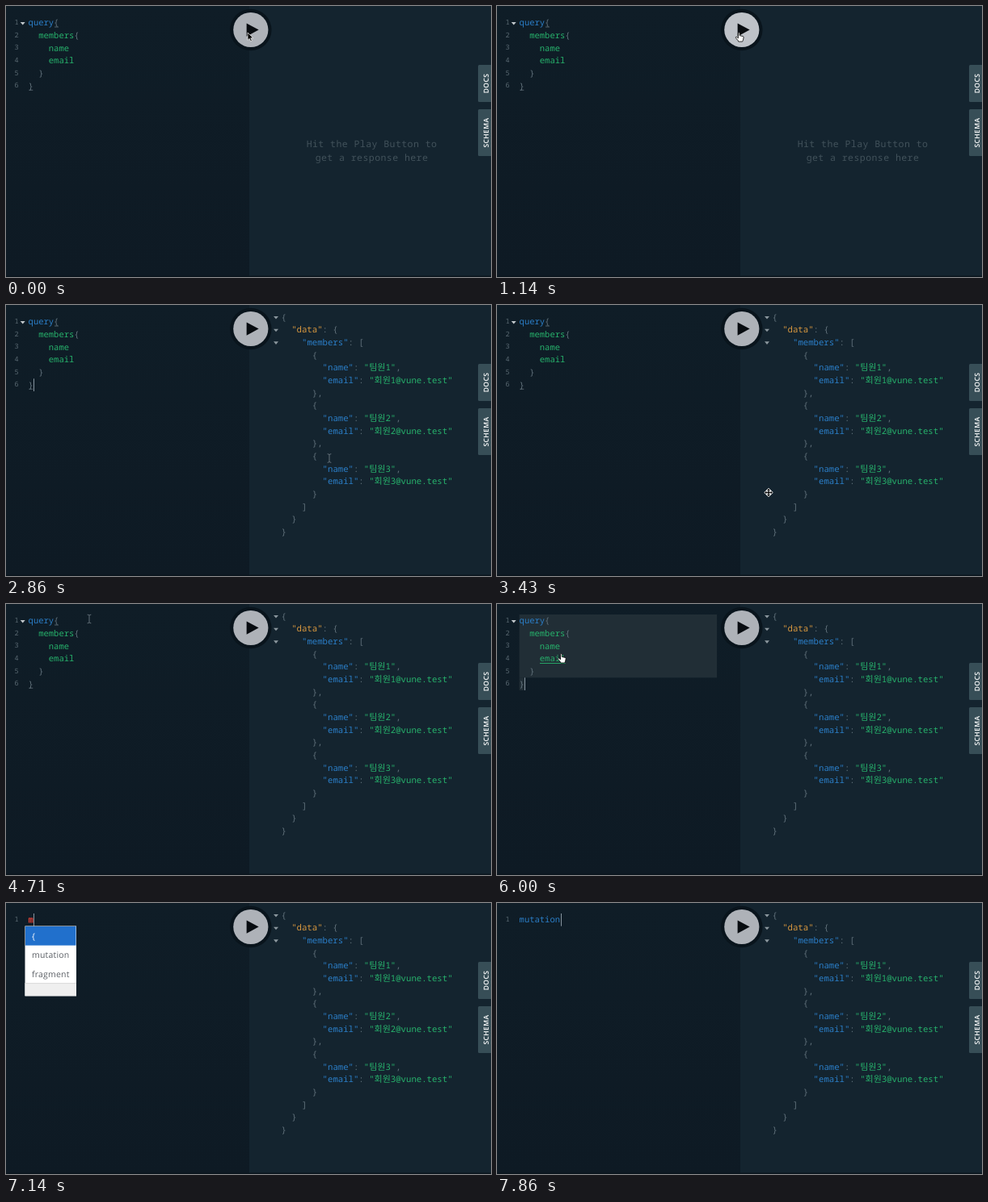
These frames come from a looping animation (600x336 px, 8 s). An HTML page:

```html
<!DOCTYPE html>
<html lang="ko">
<head>
<meta charset="utf-8">
<style>
html, body { margin: 0; width: 100%; height: 100%; overflow: hidden; background: #0e1b25; }
svg { display: block; width: 600px; height: 336px; }
text { font: 10.5px "Noto Sans Mono", "Noto Sans CJK KR", monospace; fill: #60707a; text-rendering: geometricPrecision; white-space: pre; }
.kw { fill: #2b7fc9; }
.def { fill: #d9983f; }
.str { fill: #27b26c; }
.json { font-size: 10.67px; }
.ko { font: 11px "Noto Sans CJK KR", sans-serif; }
.num { font-size: 8.6px; fill: #596871; }
.hint { font-size: 11.5px; letter-spacing: .45px; fill: #42525b; text-anchor: middle; }
.tab { font: 600 8.5px "Open Sans", sans-serif; letter-spacing: .4px; fill: #fff; text-anchor: middle; }
.item { font: 10.5px "Open Sans", sans-serif; letter-spacing: .2px; fill: #5c6066; }
.err { fill: #e2483c; }
</style>
</head>
<body>
<svg viewBox="0 0 600 336">
  <defs>
    <linearGradient id="left" x2="0" y2="1"><stop stop-color="#0f1d27"/><stop offset="1" stop-color="#0e1a24"/></linearGradient>
  </defs>
  <rect width="301" height="336" fill="url(#left)"/>
  <rect x="301" width="299" height="336" fill="#14242f"/>
  <rect y="334.5" width="600" height="1.5" fill="#0a151d"/>
  <g id="scene"></g>
</svg>
<script>
const TICKS = 56, PER_SECOND = 7;
const CHAR = 6.3, JSON_CHAR = 6.4, ROW = 15.66, LEFT = 27.6, RIGHT = 340.4;
const scene = document.getElementById('scene');

const text = (x, y, s, cls = '') => `<text x="${x}" y="${y}" class="${cls}">${s}</text>`;
const rect = (x, y, w, h, fill, extra = '') =>
  `<rect x="${x}" y="${y}" width="${w}" height="${h}" fill="${fill}" ${extra}/>`;
const span = (cls, s) => `<tspan class="${cls}">${s}</tspan>`;
const fold = (x, y, fill) => `<path d="M${x - 3} ${y - 1.5}h6l-3 3.6z" fill="${fill}"/>`;
const leftY = row => 24.4 + row * ROW;
const rowTop = row => 13 + row * ROW;

const query = [
  [0, span('kw', 'query') + '{'],
  [2, span('str', 'members') + '{'],
  [4, span('str', 'name')],
  [4, span('str', 'email')],
  [2, '}'],
  [0, '}']
];

const members = [1, 2, 3].map(n => ({ name: '팀원' + n, email: `회원${n}@vune.test` }));
const json = JSON.stringify({ data: { members } }, null, 2).split('\n');

function colour(line) {
  return line.trim()
    .replace(/"([^"]*)"(:?)/g, (m, word, colon) =>
      span(!colon ? 'str' : word === 'data' ? 'def' : 'kw', `"${word}"`) + colon)
    .replace(/[가-힣]+/g, s => span('ko', s));
}

const response = json.map((line, i) =>
  text(RIGHT + line.search(/\S/) * JSON_CHAR, 18.8 + i * ROW, colour(line), 'json')).join('');
const hint = text(452.5, 175, 'Hit the Play Button to', 'hint') + text(452.5, 192, 'get a response here', 'hint');

const tab = (y, h, label) => rect(584, y, 18, h, '#374e57', 'rx="1.5"') +
  `<text class="tab" transform="translate(596.8 ${y + h / 2}) rotate(-90)">${label}</text>`;
const tabs = tab(73, 46, 'DOCS') + tab(128, 58, 'SCHEMA');

const button = fill => `<circle cx="302.8" cy="29.5" r="25.7" fill="#09141c"/>
  <circle cx="302.8" cy="29.5" r="21.6" fill="${fill}"/><path d="M297.6 21.5l15 8.1-15 8.1z" fill="#080c10"/>`;

const pointers = {
  arrow: '<path d="M0 0V9.4L2.2 7.4L3.7 10.8L5.3 10L3.8 6.8H6.8Z" fill="#000" stroke="#fff" stroke-width=".7"/>',
  hand: `<path d="M-1.5 -4.3c0-1.5 1.8-1.5 1.8 0v2.8l4 .9q1 .3 .9 1.4l-.6 3.2-.9 2H-1.2l-.5-1.3-2.7-3.2
    c-.8-1 .4-1.9 1.3-1.1l1.6 1.4z" fill="#fff" stroke="#000" stroke-width=".8"/>`,
  move: `<path d="M0-5.3L2.6-2.6H1.1V-1.1H2.6V-2.6L5.3 0L2.6 2.6V1.1H1.1V2.6H2.6L0 5.3L-2.6 2.6H-1.1V1.1H-2.6V2.6
    L-5.3 0L-2.6-2.6V-1.1H-1.1V-2.6H-2.6Z" fill="#111" stroke="#fff" stroke-width=".9"/>`,
  beam: '<path d="M-2.3-5.3Q0-5.3 0-4V4Q0 5.3-2.3 5.3M2.3-5.3Q0-5.3 0-4M0 4Q0 5.3 2.3 5.3" fill="none" stroke="#64717a"/>'
};

// tick, x, y, pointer used from that tick on
const path = [
  [0, 299, 33, 'arrow'], [2, 299.5, 37, 'hand'], [7, 299.5, 37, 'hand'], [9, 300.3, 39.3, 'hand'],
  [14, 300.3, 39.3, 'hand'], [16, 345, 80, 'beam'], [20, 400, 190, 'beam'], [21, 400, 190, 'beam'],
  [23, 336, 232.5, 'move'], [25, 336, 232.5, 'move'], [26, 290, 200, 'beam'], [32, 103, 18.5, 'beam'],
  [34, 103, 18.5, 'beam'], [36, 79, 66, 'beam'], [42, 80, 67, 'hand'], [43, 80, 67, 'beam'], [44, 80, 67, 'beam']
];

function mouse(k) {
  const i = path.findIndex(p => p[0] > k);
  if (i < 0) return '';
  const [t0, x0, y0, kind] = path[i - 1], [t1, x1, y1] = path[i];
  const u = (k - t0) / (t1 - t0), e = kind === 'arrow' ? 0 : u * u * (3 - 2 * u);
  return `<g transform="translate(${x0 + (x1 - x0) * e} ${y0 + (y1 - y0) * e})">${pointers[kind]}</g>`;
}

const blinks = [2, 5, 9, 13, 17, 21, 25, 29, 34, 36, 37, 40, 42, 45, 47];
function caret(k, typed) {
  if (blinks.filter(b => b <= k).length % 2 === 0) return '';
  const [x, row] = k >= 44 ? [LEFT + typed.length * CHAR + 1, 0] : k >= 37 && k < 42 ? [79, 3] : [34, 5];
  return rect(Math.floor(x), rowTop(row), 1, ROW, '#8795a0');
}

function popup(items, active) {
  const h = 23.6, end = 28.5 + items.length * h;
  return rect(23.5, 28.5, 63.5, end - 12.5, '#fff') + rect(23.5, end, 63.5, 16, '#efefef') +
    rect(23.5, end, 63.5, .8, '#d4d4d4') +
    items.map((s, i) => (i === active ? rect(24, 29 + i * h, 62.5, h, '#2170cc') : '') +
      `<text x="32" y="${44.5 + i * h}" class="item"${i === active ? ' style="fill:#fff"' : ''}>${s}</text>`).join('');
}

function editor(k) {
  if (k >= 44) {
    const typed = k >= 55 ? 'mutation' : k >= 51 ? 'mu' : k >= 48 ? 'm' : '';
    const bad = typed && k < 55, w = typed.length * CHAR;
    return text(10.6, 23.1, 1, 'num') +
      (bad ? rect(LEFT, 18.5, w, 6.5, '#8c2b28', 'opacity=".6"') : '') +
      text(LEFT, leftY(0), typed, bad ? 'err' : 'kw') + caret(k, typed) +
      (k < 49 || k >= 55 ? '' : k < 51 ? popup(['{', 'mutation', 'fragment'], 0) : popup(['{', 'mutation'], k > 51 ? 1 : 0));
  }
  const selected = k >= 42, fill = '#212e36';
  return (selected ? rect(LEFT, 13, 244.5, 5 * ROW, fill) + rect(LEFT, rowTop(5), CHAR, ROW, fill) : '') +
    query.map(([indent, s], i) => text(10.6, 23.1 + i * ROW, i + 1, 'num') + text(LEFT + indent * CHAR, leftY(i), s)).join('') +
    fold(20.7, 21.4, '#c3c9cd') +
    (k < 36 ? rect(60, 25.6, 5, .8, '#60707a') + rect(28.3, 103.8, 5, .8, '#60707a') : '') +
    (k === 42 ? rect(53, 73, 31.5, .9, '#27b26c') : '') + caret(k, '');
}

function draw(k) {
  const fill = k < 2 || k >= 16 ? '#aeb2b8' : k < 3 ? '#b6bac0' : '#bec2c8';
  const folds = k >= 17 ? [15.5, 31.2, 46.8].map(y => fold(334, y, '#8b979e')).join('') : '';
  scene.innerHTML = editor(k) + (k < 13 ? hint : response + folds) + tabs + button(fill) + mouse(k);
}

let last = -1;
function loop(now) {
  const k = Math.floor((now + 3) / 1000 * PER_SECOND) % TICKS;
  if (k !== last) draw(last = k);
  requestAnimationFrame(loop);
}
draw(0);
requestAnimationFrame(loop);
</script>
</body>
</html>
```
